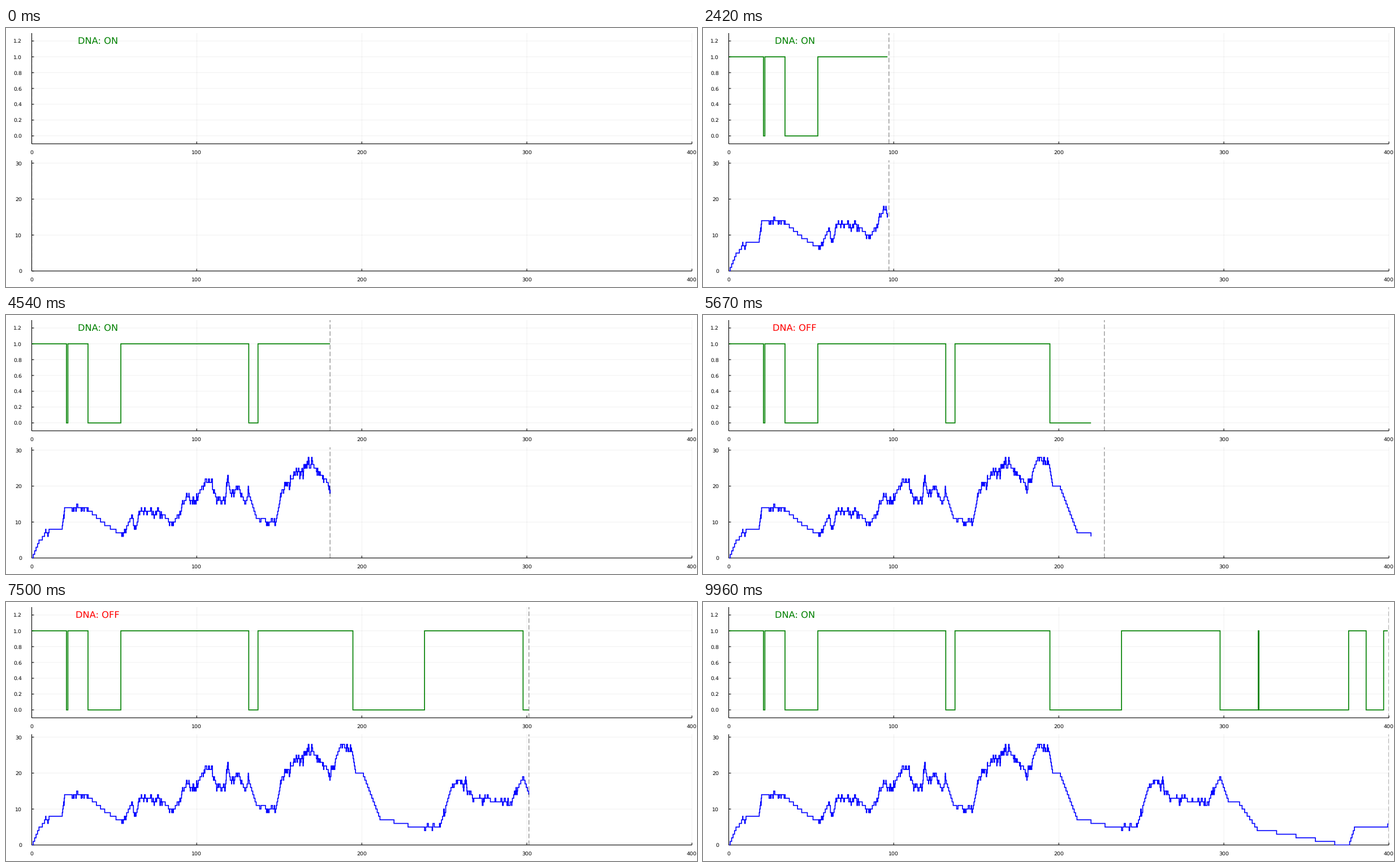
These frames come from a looping animation (1222 px wide and 458 px high, 10000 ms). A matplotlib script:

```python
import numpy as np
import matplotlib.pyplot as plt
from matplotlib.animation import FuncAnimation
from matplotlib.patches import Rectangle

W, H, DPI = 1222, 458, 100
FRAMES, LOOP_MS = 240, 10000
T_END = 400
PT = 72 / DPI  # points per pixel

plt.rcParams.update({
    "font.family": "DejaVu Sans",
    "text.hinting": "none",
    "path.snap": False,
})

# Times at which the gene flips between on and off (it starts on).
SWITCHES = [21.05, 21.9, 34.1, 54.0, 131.5, 137.1, 194.6,
            238.0, 297.7, 320.85, 321.25, 375.6, 386.2, 396.8]

# Main turning points (time, count) of the molecule number.
KEYS = [
    (0, 0), (4.4, 5), (10.5, 8), (18.2, 8), (19.9, 14), (31.7, 14),
    (44.2, 9), (54.5, 6), (60.5, 12), (62.7, 8), (65.5, 13), (77, 13),
    (84.8, 9), (93.5, 17), (97.8, 15), (104, 21), (109.5, 20), (112, 16),
    (117, 17), (118.7, 22), (120.3, 18), (125, 20), (129, 15), (131.2, 18),
    (136, 11), (147.3, 9), (151.6, 19), (160.2, 24), (169.1, 26),
    (180.5, 20), (187.1, 28), (194.4, 25), (196.2, 20), (201, 19), (211, 7),
    (228, 5), (247, 5), (254, 16), (258, 18), (267, 13), (288.8, 11),
    (297.4, 19), (302.6, 12), (308, 12), (320.2, 4), (367.2, 0), (375.5, 0),
    (379.1, 5), (399.3, 6),
]

gene_t = np.array([0] + SWITCHES)
gene_on = 1 - np.arange(len(gene_t)) % 2


def last_index(times, t):
    return np.searchsorted(times, t, side="right") - 1


def is_on(t):
    return gene_on[last_index(gene_t, t)]


def ramp_events():
    """Single up or down steps spread evenly between turning points."""
    for (t0, a), (t1, b) in zip(KEYS, KEYS[1:]):
        n = abs(b - a)
        for k in range(1, n + 1):
            yield t0 + (t1 - t0) * k / n, np.sign(b - a)


def blip_events(rng):
    """Brief births and deaths while the gene is on, denser at high counts."""
    times, counts = zip(*KEYS)
    s = 0
    while s < T_END - 2:
        n = np.interp(s, times, counts)
        s += rng.exponential(22 / max(n, 2))
        stop = s + rng.uniform(0.2, 0.9)
        step = 1 if n < 3 else rng.choice([-1, 1])
        if stop < T_END and is_on(s) and is_on(stop):
            yield s, step
            yield stop, -step


def molecule_count():
    rng = np.random.default_rng(7)
    events = sorted([(0, 0), *ramp_events(), *blip_events(rng)])
    times, steps = np.array(events).T
    return times, np.cumsum(steps)


count_t, count_n = molecule_count()
all_t = np.sort(np.concatenate([count_t, gene_t]))

# Stage layout in pixels, y pointing down.
LEFT, RIGHT, PANEL_H = 45.5, 1213.0, 195.8


def px(t):
    return LEFT + (RIGHT - LEFT) * t / T_END


def gene_y(v):
    return 204.8 - PANEL_H * (v + 0.1) / 1.4


def count_y(v):
    return 429.7 - PANEL_H * v / 30.8


fig = plt.figure(figsize=(W / DPI, H / DPI), dpi=DPI, facecolor="white")
ax = fig.add_axes([0, 0, 1, 1])
ax.set(xlim=(0, W), ylim=(H, 0))
ax.axis("off")


def line(xs, ys, width, color="black", **kw):
    kw = {"solid_capstyle": "butt", "solid_joinstyle": "miter",
          "dash_capstyle": "butt", **kw}
    return ax.plot(xs, ys, lw=width * PT, color=color, **kw)[0]


def label(x, y, text, size=9.4, ha="center", **kw):
    return ax.text(x, y, text, fontsize=size * PT, ha=ha, va="baseline", **kw)


def panel(to_y, low, high, ticks, fmt, color):
    """Draw grid and axes; return the panel's curve and time marker."""
    bottom, top = to_y(low), to_y(high)
    for t in range(0, T_END + 1, 100):
        x = px(t)
        line([x, x], [bottom, top], 0.6, alpha=0.1)
        line([x, x], [bottom, bottom - 4], 1.1)
        label(x, bottom + 18.2, str(t))
    for v in ticks:
        y = to_y(v)
        line([LEFT, RIGHT], [y, y], 0.6, alpha=0.1)
        line([LEFT, LEFT + 4], [y, y], 1.1)
        label(28.3, y + 3.5, format(v, fmt), ha="right")
    line([LEFT, RIGHT], [bottom, bottom], 1.1)
    line([LEFT, LEFT], [bottom, top], 1.1)

    curve = line([], [], 1.65, color, drawstyle="steps-post", zorder=3)
    marker = line([LEFT, LEFT], [bottom, top], 1.16, alpha=0.5,
                  dashes=(8 / 1.16, 4 / 1.16), zorder=4)
    for artist in (curve, marker):
        artist.set_clip_path(Rectangle((LEFT, bottom), RIGHT - LEFT,
                                       top - bottom, transform=ax.transData))
    return curve, marker


gene_line, gene_mark = panel(gene_y, -0.1, 1.3, np.arange(7) * 0.2, ".1f",
                             "green")
count_line, count_mark = panel(count_y, 0, 30.8, range(0, 31, 10), "d", "blue")
status = label(px(40), 29.2, "", size=16.25, zorder=5)


def trace(artist, times, values, to_y, end):
    k = last_index(times, end) + 1
    xs = np.append(times[:k], end)
    ys = np.append(values[:k], values[k - 1])
    artist.set_data(px(xs), to_y(ys))


def update(i):
    now = T_END * i / (FRAMES - 1)
    # Curves reach only as far as the latest event.
    end = all_t[last_index(all_t, now)]
    trace(gene_line, gene_t, gene_on, gene_y, end)
    trace(count_line, count_t, count_n, count_y, end)
    for mark in (gene_mark, count_mark):
        mark.set_xdata([px(now)] * 2)
    on = is_on(now)
    status.set_text("DNA: ON" if on else "DNA: OFF")
    status.set_color("green" if on else "red")
    return gene_line, count_line, gene_mark, count_mark, status


anim = FuncAnimation(fig, update, frames=FRAMES, interval=LOOP_MS / FRAMES,
                     repeat=True, repeat_delay=0, blit=False)
plt.show()
```
